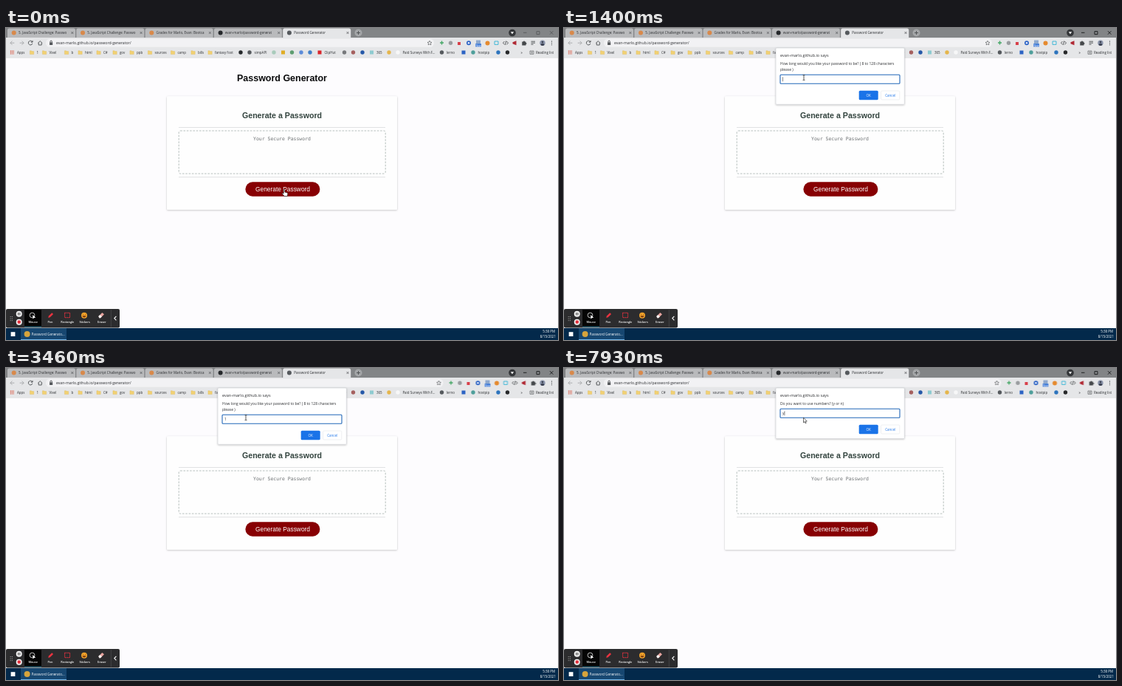
Write an HTML page that moves like this. It is 748 px wide and 422 px high and loops after 8000 ms.

```html
<!DOCTYPE html>
<html lang="en">
<head>
<meta charset="utf-8">
<title>Password Generator</title>
<style>
html, body { margin: 0; width: 100%; height: 100%; overflow: hidden; background: #fdfcfe; }
svg { display: block; width: 748px; height: 422px; }
text { font-family: "Open Sans", "Noto Sans", sans-serif; font-size: 4.5px; fill: #2b2d30; }
.arial { font-family: "Liberation Sans", Arial, sans-serif; }
.mono { font-family: "DejaVu Sans Mono", monospace; }
.mid { text-anchor: middle; }
.end { text-anchor: end; }
.line { fill: none; stroke: #4a4d50; stroke-width: .9; }
.light, .light text { fill: #fff; }
.msg { font-size: 4.95px; }

/* Everything but the pointer path switches in hard steps. */
.p1, .p2, .caret, .typed, .shift, .media, .omni, .hand, .arrow, .beam, .winbtn { animation: 8s step-end infinite; }
.p1 { animation-name: first; }
.p2 { animation-name: second; }
.caret { animation-name: caret; }
.shift { animation-name: shift; }
.media { animation-name: media; }
.omni { animation-name: omni; }
.hand { animation-name: hand; }
.arrow { animation-name: arrow; }
.beam { animation-name: beam; }
.winbtn { animation-name: winbtn; }
.pointer { animation: travel 8s linear infinite; }
.k1 { animation-name: k1; }
.k2 { animation-name: k2; }
.k3 { animation-name: k3; }
.ky { animation-name: ky; }

@keyframes first { 0% { opacity: 0 } 4.25% { opacity: 1 } 65%, 100% { opacity: 0 } }
@keyframes second { 0% { opacity: 0 } 65%, 100% { opacity: 1 } }
@keyframes winbtn { 0% { opacity: .4 } 4.25%, 100% { opacity: 1 } }
@keyframes k1 { 0% { fill-opacity: 0 } 43.2%, 100% { fill-opacity: 1 } }
@keyframes k2 { 0% { fill-opacity: 0 } 46.6%, 100% { fill-opacity: 1 } }
@keyframes k3 { 0% { fill-opacity: 0 } 49.1%, 100% { fill-opacity: 1 } }
@keyframes ky { 0% { fill-opacity: 0 } 94.1%, 100% { fill-opacity: 1 } }
@keyframes caret {
  0% { opacity: 0; transform: translate(0, 0) }
  4.25% { opacity: 1 } 10.87% { opacity: 0 }
  17.4% { opacity: 1 } 24.12% { opacity: 0 }
  30.75% { opacity: 1 } 37.5% { opacity: 0 }
  44.1% { opacity: 1; transform: translate(2.9px, 0) }
  46.6% { transform: translate(5.7px, 0) }
  49.1% { transform: translate(8.5px, 0) }
  55.75% { opacity: 0 } 62.5% { opacity: 1 }
  65% { opacity: 1; transform: translate(0, -8px) }
  70.75% { opacity: 0 } 77.4% { opacity: 1 }
  84.1% { opacity: 0 } 90% { opacity: 1 }
  94.1%, 100% { opacity: 1; transform: translate(2.4px, -8px) }
}
@keyframes shift { 0% { transform: translateX(0) } 33.2%, 100% { transform: translateX(12.5px) } }
@keyframes media { 0% { opacity: 1 } 33.2%, 100% { opacity: 0 } }
@keyframes omni { 0% { width: 526px } 33.2%, 100% { width: 538.5px } }
@keyframes hand { 0% { opacity: 1 } 11.3%, 100% { opacity: 0 } }
@keyframes arrow { 0% { opacity: 0 } 11.3% { opacity: 1 } 15.2% { opacity: 0 } 99%, 100% { opacity: 1 } }
@keyframes beam { 0% { opacity: 0 } 15.2% { opacity: 1 } 99%, 100% { opacity: 0 } }
@keyframes travel {
  0% { transform: translate(377px, 218px) }
  5%, 10.6% { transform: translate(376.3px, 214.8px) }
  15.8%, 100% { transform: translate(325px, 67px) }
}
</style>
</head>
<body>
<svg viewBox="0 0 748 422">
  <defs>
    <filter id="soft" x="-10%" y="-10%" width="120%" height="130%">
      <feDropShadow dx="0" dy=".8" stdDeviation="1" flood-opacity=".25"/>
    </filter>
    <g id="form">
      <rect x="293" y="63.3" width="162" height="12" rx="1" fill="#fff" stroke="#2267b8" stroke-width="1.1"/>
      <rect x="399.7" y="84.8" width="26" height="12.4" rx="1.5" fill="#1a73e8"/>
      <text class="mid light" x="412.7" y="92.8">OK</text>
      <rect x="429.6" y="85" width="25.2" height="12" rx="1.5" fill="#fff" stroke="#dfe1e5" stroke-width=".5"/>
      <text class="mid" x="442.2" y="92.8" style="fill:#1a73e8">Cancel</text>
    </g>
  </defs>

  <rect width="748" height="422" fill="#fdfcfe"/>

  <!-- page -->
  <text class="arial mid" x="374" y="72" style="font-size:12.47px;font-weight:700;fill:#0b0b0d">Password Generator</text>
  <rect x="218" y="92.3" width="312" height="153.4" rx="1.5" fill="#fefefe" filter="url(#soft)"/>
  <text class="arial mid" x="374" y="122" style="font-size:10.64px;font-weight:700;fill:#33443f">Generate a Password</text>
  <path d="M234 134.5H514M234 201.7H514" stroke="#d4d7d8" stroke-width=".7"/>
  <rect x="234.2" y="139" width="280" height="58" rx="2" fill="none" stroke="#aeb8b6" stroke-width=".9" stroke-dasharray="2.6 1.7"/>
  <text class="mono mid" x="374" y="152.4" style="font-size:6.48px;fill:#6d7173">Your Secure Password</text>
  <rect x="324.4" y="208.3" width="101" height="19.4" rx="9.7" fill="#870003"/>
  <text class="arial mid light" x="375" y="220.7" style="font-size:8.4px">Generate Password</text>

  <!-- browser frame -->
  <rect width="748" height="13.5" fill="#828486"/>
  <g id="tabs"></g>
  <circle cx="477.5" cy="6.5" r="5" fill="#a4a6a8"/>
  <path class="line" d="M475 6.5h5M477.5 4v5" stroke="#222"/>
  <circle cx="686" cy="6.5" r="4.8" fill="#333538"/>
  <path d="M683.8 5.3h4.4l-2.2 3z" fill="#fff"/>
  <path class="line winbtn" d="M701 6.3h4.5M719 4.6h4v4h-4zM737 4.2l4.4 4.4M741.4 4.2L737 8.6" style="stroke:#161719"/>
  <rect y="13" width="748" height="27.3" fill="#e5e6e8"/>
  <path d="M0 40.3H748" stroke="#d3d4d6" stroke-width=".5"/>
  <rect class="omni" x="54" y="14.6" width="526" height="11.2" rx="5.6" fill="#f2f2f4"/>
  <path class="line" d="M11.3 20.2H5.8m2.6-2.6l-2.6 2.6l2.6 2.6M18.6 20.2h5.5m-2.6-2.6l2.6 2.6l-2.6 2.6" style="stroke:#a5a7a9"/>
  <path class="line" d="M35.7 19a2.8 2.8 0 1 0 .1 2M36 17v2.2h-2.2M43.2 20.4l3-2.7 3 2.7M44.2 20v3h4v-3"/>
  <path d="M59 19.3h4.2V23H59z" fill="#55585b"/>
  <path class="line" d="M59.9 19.3v-1a1.2 1.2 0 0 1 2.4 0v1"/>
  <text x="68" y="22.2" style="font-size:5.13px">evan-marlo.github.io/password-generator/</text>
  <g class="shift">
    <path class="line" d="M574 17.2l.9 2 2.1.2-1.6 1.4.5 2.1-1.9-1.1-1.9 1.1.5-2.1-1.6-1.4 2.1-.2z" style="stroke-width:.6"/>
    <path d="M588 20h5M590.5 17.5v5" stroke="#48a868" stroke-width="1.5"/>
    <g id="addons"></g>
    <text class="mid" x="640" y="24.6" style="font-size:3.5px;fill:#fff">New</text>
    <path class="line" d="M662 18h5v4.4h-5z" style="stroke:#31b4d5"/>
    <path class="line" d="M675.5 18l-2 2.2 2 2.2M678.5 18l2 2.2-2 2.2M677.7 17.5l-1.2 5.4"/>
    <path d="M686.5 19.2l5-2v6l-5-2zM688 21l1 2.6" fill="#b02a35"/>
    <path d="M699.3 18.4h1.7a1 1 0 0 1 2 0h1.5v1.6a1 1 0 0 1 0 2v1.4h-5.2z" fill="#45484b"/>
  </g>
  <path class="line media" d="M711.5 18.2h5.5M711.5 20.2h5.5M711.5 22.2h3"/>
  <circle cx="727" cy="20.2" r="3.7" fill="#8b95ab"/>
  <path d="M724.4 22.7a2.7 2.7 0 0 1 5.2 0a3.7 3.7 0 0 1-5.2 0z" fill="#3c4252"/>
  <circle cx="727" cy="19" r="1.3" fill="#3c4252"/>
  <path d="M739.5 17.6v6" stroke="#45484b" stroke-width="1.1" stroke-dasharray="1.1 1.2"/>
  <g id="marks"></g>
  <path d="M5.8 31.2h5M5.8 33.1h5M5.8 35h5" stroke="#d95b45" stroke-width="1.2" stroke-dasharray="1.2 .7"/>
  <path class="line" d="M710 31h5v4.3h-5zM711.3 32.5h2.5M711.3 34h2.5" style="stroke-width:.6"/>

  <!-- prompts -->
  <g class="p1">
    <rect x="287" y="27" width="174.3" height="76.3" rx="1" fill="#fff" stroke="#c3c5c8" stroke-width=".5" filter="url(#soft)"/>
    <text x="293" y="38.9" style="font-size:5.5px">evan-marlo.github.io says</text>
    <text class="msg" x="293" y="50.4">How long would you like your password to be? ( 8 to 128 characters</text>
    <text class="msg" x="293" y="58.4">please )</text>
    <use href="#form"/>
    <text class="msg" x="296" y="71"><tspan class="typed k1">1</tspan><tspan class="typed k2">2</tspan><tspan class="typed k3">8</tspan></text>
  </g>
  <g class="p2">
    <rect x="287" y="27" width="174.3" height="68.6" rx="1" fill="#fff" stroke="#c3c5c8" stroke-width=".5" filter="url(#soft)"/>
    <text x="293" y="38.9" style="font-size:5.5px">evan-marlo.github.io says</text>
    <text class="msg" x="293" y="50.4">Do you want to use numbers? (y or n)</text>
    <use href="#form" y="-8"/>
    <text class="msg typed ky" x="296" y="63">y</text>
  </g>
  <path class="caret" d="M296.4 66.3v6" stroke="#222" stroke-width=".6"/>

  <!-- recorder bar -->
  <rect x="0" y="380" width="154" height="25.5" rx="2" fill="#2c2c2e"/>
  <path d="M6.2 390v7M8.4 390v7" stroke="#aaa" stroke-width="1" stroke-dasharray="1 1.6"/>
  <circle cx="17.7" cy="386.7" r="4" fill="#f5f5f5"/>
  <path d="M16.6 384.9v3.6M18.8 384.9v3.6" stroke="#333" stroke-width="1"/>
  <circle cx="17.7" cy="397.7" r="4" fill="#f5f5f5"/>
  <rect x="15.6" y="395.6" width="4.2" height="4.2" rx="1" fill="#e2303d"/>
  <rect x="25" y="381" width="23" height="23.5" fill="#050505"/>
  <path d="M25 404.2h23" stroke="#3fa2c9" stroke-width=".8"/>
  <circle cx="35.5" cy="388.5" r="3.4" fill="none" stroke="#eee" stroke-width=".8"/>
  <path d="M36 388l4.2 3.8-2.1.1-1.5 1.6z" fill="#fff"/>
  <path d="M57.2 392l.7-2.5 4.3-4.3 1.8 1.8-4.3 4.3z" fill="#ef3340"/>
  <rect x="79.6" y="385.3" width="7" height="6.4" fill="none" stroke="#ef3340" stroke-width="1" stroke-dasharray="1.6 .7"/>
  <circle cx="106" cy="388.7" r="4" fill="#f4a52b"/>
  <path d="M104 387.3h1.2M107 387.3h1.2M103.8 389.5a2.3 2.3 0 0 0 4.4 0z" stroke="#7b3b12" stroke-width=".7" fill="#7b3b12"/>
  <path d="M125.3 390l5-5 2.7 2.2-5 5h-1.6z" fill="#e8a5a0"/>
  <path d="M125.3 390l1.9-1.9 2.7 2.2-1.9 1.9h-1.6z" fill="#f3f3f3"/>
  <g id="tools" class="light"></g>
  <path d="M142.3 381v23.5" stroke="#555" stroke-width=".6"/>
  <path d="M149.4 389.8l-2.6 2.8 2.6 2.8" fill="none" stroke="#fff" stroke-width="1.1"/>

  <!-- taskbar -->
  <rect y="406" width="748" height="16" fill="#03294b"/>
  <rect x="20" y="406" width="62" height="16" fill="#174771"/>
  <path d="M20 421.5h62" stroke="#70b5ea" stroke-width="1"/>
  <rect x="6.6" y="411.2" width="5.8" height="5.8" fill="#fff"/>
  <circle cx="28.6" cy="414" r="4" fill="#d6a43c"/>
  <g class="light">
    <text x="34.5" y="415.8" style="font-size:4.55px">Password Generato...</text>
    <text class="end" x="744" y="412">5:38 PM</text>
    <text class="end" x="745" y="419.4">8/15/2021</text>
  </g>

  <!-- pointer, hotspot at 0,0 -->
  <g class="pointer">
    <path class="hand" d="M-.8.6Q0-.6.8.6V4l3.2.8q.9.3.8 1.3L4.3 9.5H.2L-2.8 6q-.2-1 1-.7l1 .7z" fill="#fff" stroke="#111" stroke-width=".6"/>
    <path class="arrow" d="M-.5 0v7l1.6-1.5 1.1 2.4 1-.5-1.1-2.3h2.2z" fill="#fff" stroke="#111" stroke-width=".6"/>
    <path class="beam" d="M-1.4-3.3H-.3L0-3l.3-.3h1.1M0-3V3.2M-1.4 3.5H-.3L0 3.2l.3.3h1.1" fill="none" stroke="#111" stroke-width=".7"/>
  </g>
</svg>
<script>
const put = (id, html) => { document.getElementById(id).innerHTML = html; };
const label = (x, y, s, cls = '') => `<text x="${x}" y="${y}" class="${cls}">${s}</text>`;
const dot = (x, y, color, r = 2.7) => `<circle cx="${x}" cy="${y}" r="${r}" fill="${color}"/>`;
const box = (x, y, color, r = 2.5) => `<rect x="${x - r}" y="${y - r}" width="${2 * r}" height="${2 * r}" fill="${color}"/>`;
const folder = x => `<path d="M${x - 2.6} 30.8h2l.7.8h2.6v4h-5.3z" fill="#f2d173" stroke="#d5ad45" stroke-width=".3"/>`;

const tabs = [
  ['5. JavaScript Challenge: Passwo', '#d8894b'],
  ['5. JavaScript Challenge: Passwo', '#d8894b'],
  ['Grades for Marlo, Evan: Bootca', '#d8894b'],
  ['evan-marlo/password-generat', '#25282b'],
  ['Password Generator', '#55595d']
];
put('tabs', tabs.map(([name, color], i) => {
  const x = 2 + i * 93.3;
  const fill = i === 4 ? '#e5e6e8' : '#b9babc';
  return `<path d="M${x} 13.5V3q0-2.5 2.5-2.5h87q2.5 0 2.5 2.5V13.5z" fill="${fill}"/>` +
    dot(x + 8.7, 6.6, color, 3) + label(x + 15, 8.3, name) +
    `<path class="line" style="stroke-width:.7" d="M${x + 86.3} 5l3 3m0-3l-3 3"/>`;
}).join(''));

put('addons',
  dot(602.5, 20.2, '#9a9da0') + box(614, 21, '#d8404a', 2) + dot(627, 20.2, '#2c63c4', 3) +
  dot(627, 20.2, '#e9eefa', 1.3) + box(640, 19.5, '#8fa9cd', 3) +
  '<rect x="636" y="21.3" width="8" height="4" fill="#3b78d8"/>' + dot(652.5, 20.4, '#e58a2f', 3));

const folders = { 35: '1', 52: 'Vixel', 82: 'b', 100.5: 'html', 125.5: 'C#', 147.5: 'gov', 170.5: 'ppb',
  195: 'sources', 226: 'camp', 253.5: 'bills', 276.5: 'fantasy foot' };
const sites = [
  [318, '#25282b'], [330, '#55595d', 'simpAPI'], [363, '#a9cbbb'], [375.5, '#e0ac25'],
  [387.5, '#5d9d70'], [400, '#5b8bd9'], [412, '#3f7fc7'], [425, '#d9252a', 'ClipHut'],
  [458.5, '#77797c'], [470.5, '#a5605f'], [483, '#2558a8'], [495.5, '#8ecbd0', '365'],
  [519, '#e5b64c'], [531, '#f7f7f8', 'Paid Surveys With F...'], [590.5, '#55595d', 'lerno'],
  [620, '#2c63c4'], [633, '#4f9f9b', 'hostpip'], [667, '#2d74bd'], [679.5, '#28292b']
];
put('marks',
  Object.entries(folders).map(([x, s]) => folder(+x) + label(+x + 6.4, 34.8, s)).join('') +
  sites.map(([x, color, s = ''], i) =>
    (i % 4 === 3 ? box : dot)(x, 33, color) + label(x + 6.4, 34.8, s)).join('') +
  label(15, 34.8, 'Apps') + label(697.5, 34.8, '»') + label(718, 34.8, 'Reading list'));

put('tools', ['Mouse', 'Pen', 'Rectangle', 'Stickers', 'Eraser']
  .map((s, i) => `<text class="mid" x="${36.7 + i * 23.3}" y="399.3" style="font-size:3.8px;font-weight:600">${s}</text>`).join(''));
</script>
</body>
</html>
```
